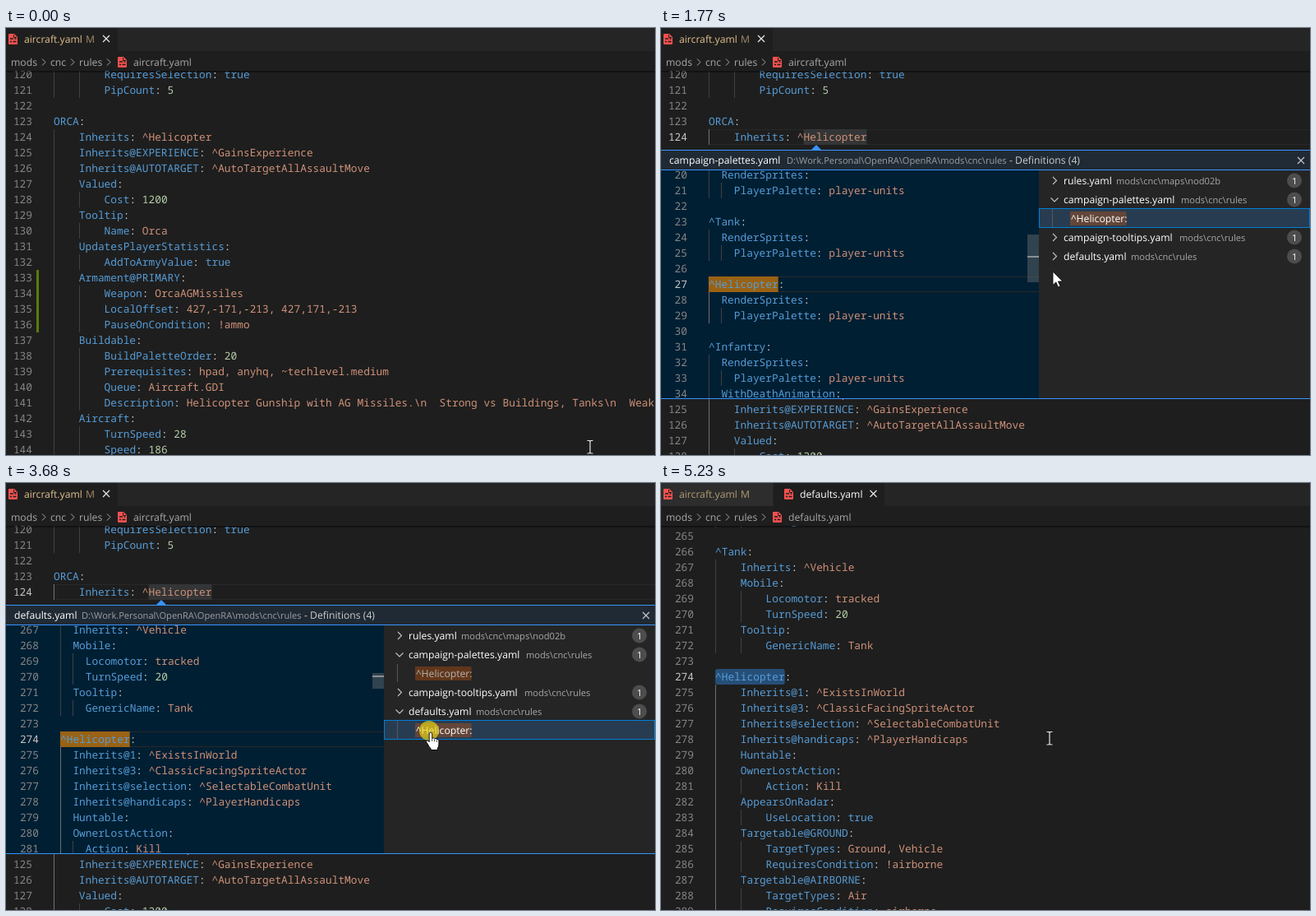
An HTML page for the animation above (5.29 s loop, 790x519 px).

```html
<!DOCTYPE html>
<html lang="en">
<head>
<meta charset="utf-8">
<title>Go to definition</title>
<style>
  html, body { margin: 0; width: 100%; height: 100%; overflow: hidden; background: #1e1e1e; }
  svg { display: block; }
  text { white-space: pre; text-rendering: geometricPrecision; }
  .code { font: 12.833px "Noto Sans Mono", "DejaVu Sans Mono", monospace; }
  .ui { font: 12.2px "Open Sans", "Noto Sans", sans-serif; }
  .path { font-size: 11.1px; }
</style>
</head>
<body>
<svg id="stage" width="790" height="519" viewBox="0 0 790 519">
  <g id="scene"></g>
  <g id="pointer"></g>
</svg>
<script>
const LOOP = 5290, ROW = 19, CHAR = 7.7, BLUE = '#3794ff';

const aircraft = { first: 120, lines: String.raw`
        RequiresSelection: true
        PipCount: 5

ORCA:
    Inherits: ^Helicopter
    Inherits@EXPERIENCE: ^GainsExperience
    Inherits@AUTOTARGET: ^AutoTargetAllAssaultMove
    Valued:
        Cost: 1200
    Tooltip:
        Name: Orca
    UpdatesPlayerStatistics:
        AddToArmyValue: true
    Armament@PRIMARY:
        Weapon: OrcaAGMissiles
        LocalOffset: 427,-171,-213, 427,171,-213
        PauseOnCondition: !ammo
    Buildable:
        BuildPaletteOrder: 20
        Prerequisites: hpad, anyhq, ~techlevel.medium
        Queue: Aircraft.GDI
        Description: Helicopter Gunship with AG Missiles.\n  Strong vs Buildings, Tanks\n  Weak
    Aircraft:
        TurnSpeed: 28
        Speed: 186`.slice(1).split('\n') };

const palettes = { first: 20, lines: `
    RenderSprites:
        PlayerPalette: player-units

^Tank:
    RenderSprites:
        PlayerPalette: player-units

^Helicopter:
    RenderSprites:
        PlayerPalette: player-units

^Infantry:
    RenderSprites:
        PlayerPalette: player-units
    WithDeathAnimation:`.slice(1).split('\n') };

const defaults = { first: 257, lines: `
    Tooltip:
        GenericName: Vehicle
    MustBeDestroyed:
    Voiced:
        VoiceSet: VehicleVoice
    HitShape:
    MapEditorData:
        Categories: Vehicle

^Tank:
    Inherits: ^Vehicle
    Mobile:
        Locomotor: tracked
        TurnSpeed: 20
    Tooltip:
        GenericName: Tank

^Helicopter:
    Inherits@1: ^ExistsInWorld
    Inherits@3: ^ClassicFacingSpriteActor
    Inherits@selection: ^SelectableCombatUnit
    Inherits@handicaps: ^PlayerHandicaps
    Huntable:
    OwnerLostAction:
        Action: Kill
    AppearsOnRadar:
        UseLocation: true
    Targetable@GROUND:
        TargetTypes: Ground, Vehicle
        RequiresCondition: !airborne
    Targetable@AIRBORNE:
        TargetTypes: Air
        RequiresCondition: airborne`.slice(1).split('\n') };

const rect = (x, y, w, h, fill, extra = '') =>
  `<rect x="${x}" y="${y}" width="${w}" height="${h}" fill="${fill}" ${extra}/>`;
const stroke = (d, color, width = 1) =>
  `<path d="${d}" fill="none" stroke="${color}" stroke-width="${width}"/>`;
const label = (x, y, s, fill, cls = '') =>
  `<text class="ui ${cls}" x="${x}" y="${y}" fill="${fill}">${s}</text>`;
const clip = (x, y, w, h, body) =>
  `<svg x="${x}" y="${y}" width="${w}" height="${h}" viewBox="${x} ${y} ${w} ${h}">${body}</svg>`;
const cross = (x, y, color) =>
  stroke(`M${x - 4} ${y - 4}l8 8m0-8l-8 8`, color, 1.2);

function valueColor(value) {
  if (value === 'true') return '#569cd6';
  return /^\d+$/.test(value) ? '#b5cea8' : '#ce9178';
}

// One file laid out so that line `anchor` starts at `top`.
function code(file, { x, tab, anchor, top, current, active = [0, -1] }) {
  return file.lines.map((line, i) => {
    const n = file.first + i, y = top + (n - anchor) * ROW;
    const depth = (line.length - line.trimStart().length) / 4;
    let out = `<text class="code" x="${x - 26}" y="${y + 14}" text-anchor="end" fill="${n === current ? '#c6c6c6' : '#858585'}">${n}</text>`;
    for (let k = 0; k < depth; k++) {
      const lit = k === 0 && n >= active[0] && n <= active[1];
      out += rect(Math.round(x + k * tab * CHAR), y, 1, ROW, lit ? '#707070' : '#404040');
    }
    const [, key, value] = line.trim().match(/^([^:]*):? ?(.*)$/);
    if (key) out += `<text class="code" x="${x + depth * tab * CHAR}" y="${y + 14}" fill="#569cd6">${key}<tspan fill="#d4d4d4">: </tspan><tspan fill="${valueColor(value)}">${value}</tspan></text>`;
    return out;
  }).join('');
}

const fileIcon = (x, y) =>
  `<path d="M${x + 1} ${y}h6l4 4v8q0 1-1 1h-9q-1 0-1-1v-11q0-1 1-1z" fill="#f4514f"/>` +
  stroke(`M${x + 2} ${y + 6}h4m1.5 0h2M${x + 2} ${y + 9.5}h2m1.5 0h4`, '#1e1e1e', 1.3) +
  stroke(`M${x + 6.5} ${y + 1}v3.5h3.5`, '#1e1e1e');

function topBar(opened) {
  const file = opened ? 'defaults.yaml' : 'aircraft.yaml';
  let out = rect(0, 0, 790, 52, '#1e1e1e') + rect(0, 0, 790, 28, '#252526');
  out += rect(0, 0, 136, 28, opened ? '#2d2d2d' : '#1e1e1e');
  out += fileIcon(3, 7);
  const tint = opened ? '#b39a73' : '#e2c08d';
  out += label(22, 18, 'aircraft.yaml', tint) + label(97, 18, 'M', opened ? tint : '#a28b68');
  if (opened) {
    out += rect(137, 0, 135, 28, '#1e1e1e') + fileIcon(150, 7);
    out += label(169, 18, file, '#ffffff') + cross(258.5, 13, '#e8e8e8');
  } else out += cross(122, 13, '#e8e8e8');
  [['mods', 6], ['cnc', 54], ['rules', 89]].forEach(([s, x]) => out += label(x, 46, s, '#a9a9a9'));
  [44, 79, 123].forEach(x => out += stroke(`M${x} 37.5l4 4l-4 4`, '#a9a9a9'));
  return out + fileIcon(136, 35) + label(155, 46, file, '#a9a9a9') +
    rect(0, 52, 790, 2, '#000', 'opacity=".4"');
}

function resultList({ loaded, expanded, selected, hovered }) {
  const rules = 'mods\\cnc\\rules';
  const rows = [
    { name: 'rules.yaml', path: 'mods\\cnc\\maps\\nod02b', px: 554 },
    { name: 'campaign-palettes.yaml', path: rules, px: 633, open: true },
    loaded && {},
    { name: 'campaign-tooltips.yaml', path: rules, px: 631 },
    { name: 'defaults.yaml', path: rules, px: 572, open: expanded },
    expanded && {},
  ].filter(Boolean);
  let out = rect(460, 173, 330, 277, '#252526');
  rows.forEach((row, i) => {
    const y = 174 + 23 * i, mid = y + 11.5, on = i === selected;
    if (on) out += rect(460.5, y - .5, 329, 23, '#283c51', 'stroke="#007fd4"');
    else if (i === hovered) out += rect(460, y, 330, 23, '#2a2d2e');
    if (!row.name) {
      out += rect(476, y, 1, 22, '#585858') + rect(498, y + 3, 68.5, 17, '#ea5c00', 'opacity=".3"');
      out += label(499, y + 16, '^Helicopter:', on ? '#ffffff' : '#b4b4b4');
      return;
    }
    out += stroke(row.open ? `M474.5 ${mid - 2}l4.5 4.5l4.5-4.5` : `M477 ${mid - 4.5}l4.5 4.5l-4.5 4.5`, '#c5c5c5', 1.1);
    out += label(490, y + 16, row.name, '#ffffff') + label(row.px, y + 16, row.path, '#a8a8a8', 'path');
    out += `<circle cx="771" cy="${mid}" r="9" fill="#4d4d4d"/>` + label(768, mid + 4, '1', '#ffffff', 'path');
  });
  if (!loaded) out += rect(460.5, 173.5, 329, 275, 'none', 'stroke="#007fd4"');
  return out;
}

function peekEditor(s) {
  if (!s.loaded) return '';
  const x = s.picked ? 66 : 58, line = s.picked ? 274 : 27;
  const [sliderY, sliderH, markY] = s.picked ? [231, 19, 234] : [251, 58, 277];
  return rect(0, 173, 460, 277, '#001f33') +
    rect(x, 302.5, 500, 18, 'none', 'stroke="#282828"') +
    rect(x, 302, 11 * CHAR, ROW, '#996214') +
    code(s.picked ? defaults : palettes,
      { x, tab: 2, anchor: line, top: 302, current: line, active: [line + 1, s.picked ? 999 : 29] }) +
    rect(446, sliderY, 14, sliderH, '#797979', `opacity="${.4 * s.slider}"`) +
    rect(446, markY, 14, 2, '#8c9094');
}

function peek(s, source) {
  const shift = s.picked ? -61 : 0;
  return rect(0, 142, 790, 377, '#1e1e1e') +
    clip(0, 451, 790, 68, `<g transform="translate(0 312)">${source}</g>`) +
    rect(0, 149, 790, 23, '#202a34') +
    clip(0, 173, 460, 277, peekEditor(s)) + resultList(s) +
    `<path d="M182 149l7-7l7 7z" fill="${BLUE}"/>` +
    [148, 172, 450].map(y => rect(0, y, 790, 1, BLUE)).join('') +
    label(10, 165, s.picked ? 'defaults.yaml' : 'campaign-palettes.yaml', '#ffffff') +
    label(153 + shift, 165, 'D:\\Work.Personal\\OpenRA\\OpenRA\\mods\\cnc\\rules', '#9b9fa4', 'path') +
    label(424 + shift, 165, '- Definitions (4)', '#cccccc') + cross(779, 161, '#c5c5c5');
}

function view(s) {
  if (s.opened) {
    const top = 376 - s.scroll;
    return rect(66, top, 11 * CHAR, ROW, '#264f78', 'rx="3"') +
      code(defaults, { x: 66, tab: 4, anchor: 274, top, current: 274, active: [275, 999] }) +
      (s.caret ? rect(150, top, 2, ROW, '#aeafad') : '') + topBar(true);
  }
  const source = code(aircraft, { x: 58, tab: 4, anchor: 124, top: 123,
    current: s.focused && 124, active: s.focused ? [124, 999] : undefined });
  return (s.focused ? rect(58, 123.5, 740, 18, 'none', 'stroke="#282828"') : '') +
    (s.word ? rect(173.5, 123, 10 * CHAR, ROW, '#343536') : '') +
    source + rect(37, 294, 3, 4 * ROW, '#587c0c') +
    (s.peeking ? peek(s, source) : '') + topBar(false);
}

const pointers = {
  beam: '<path d="M-3.5-7.5h2.5l1 1l1-1h2.5M0-6.5v14M-3.5 8h2.5l1-1l1 1h2.5" fill="none" stroke="#e6e6e6" stroke-width="1.2"/>',
  arrow: '<path d="M0 0v16.5l3.8-3.6l2.6 6l2.6-1.1l-2.6-5.8h5.4z" fill="#fff" stroke="#000" stroke-width=".8"/>',
  hand: '<path d="M-1.8 1q1.8-2.2 3.5 0v6.2q1.8-.9 2.9.6q1.7-.8 2.7.7q2.5-.5 2.6 2v4.5q0 2.500-1.600 4.200v2.300h-8.200v-1.800q-2-1.700-3.200-4.400l-2.300-3.600q-.4-2.400 1.800-1.800l1.800 1.800z" fill="#fff" stroke="#000" stroke-width=".9"/>' +
    '<path d="M1.700 7v4M4.600 8.500v3M7.300 9.500v2.500" fill="none" stroke="#000" stroke-width=".7"/>',
};

// Progress in n equal jumps, the first at a and the last at b.
function steps(t, a, b, n) {
  if (t < a) return 0;
  if (t >= b) return 1;
  return (1 + Math.floor((t - a) / (b - a) * (n - 1) + .05)) / n;
}

const moves = [
  [70, 480, 7, 195, 129],
  [1180, 1700, 8, 470, 297],
  [1770, 1770, 1, 477, 296],
  [1840, 2180, 6, 477, 280],
  [2940, 3170, 4, 517, 303],
  [4150, 4280, 3, 473, 310],
];

function pointerAt(t) {
  let x = 711, y = 509;
  for (const [a, b, n, toX, toY] of moves) {
    const p = steps(t, a, b, n);
    x += (toX - x) * p;
    y += (toY - y) * p;
  }
  const kind = t < 1700 || t >= 3740 ? 'beam' : t < 1970 ? 'arrow' : 'hand';
  const clicking = [[820, 970], [2530, 2670], [3470, 3740]].some(([a, b]) => t >= a && t < b);
  const halo = clicking ? '<circle cx="-2" cy="-2" r="12" fill="#f0dc14" opacity=".65"/>' : '';
  return `<g transform="translate(${x} ${y})">${halo}${pointers[kind]}</g>`;
}

const easeOut = p => 1 - (1 - p) ** 2;

const stateAt = t => ({
  focused: t >= 900,
  peeking: t >= 1040,
  loaded: t >= 1110,
  word: t >= 1250,
  expanded: t >= 2600,
  picked: t >= 3610,
  opened: t >= 3740,
  selected: t < 1110 ? -1 : t < 2600 ? 2 : t < 3540 ? 4 : 5,
  hovered: t >= 1970 && t < 2600 ? 4 : -1,
  slider: t >= 3610 ? 1 : 1 - steps(t, 1840, 2180, 6),
  caret: t < 4210,
  scroll: Math.round(75 * (easeOut(steps(t, 4680, 4820, 3)) + easeOut(steps(t, 5150, 5230, 2)))),
});

const scene = document.getElementById('scene');
const pointer = document.getElementById('pointer');
let shown = '';

function update(t) {
  const state = stateAt(t), key = JSON.stringify(state);
  if (key !== shown) {
    scene.innerHTML = view(state);
    shown = key;
  }
  pointer.innerHTML = pointerAt(t);
}

const start = performance.now();
function tick() {
  update((performance.now() - start) % LOOP);
  requestAnimationFrame(tick);
}
tick();
</script>
</body>
</html>
```
